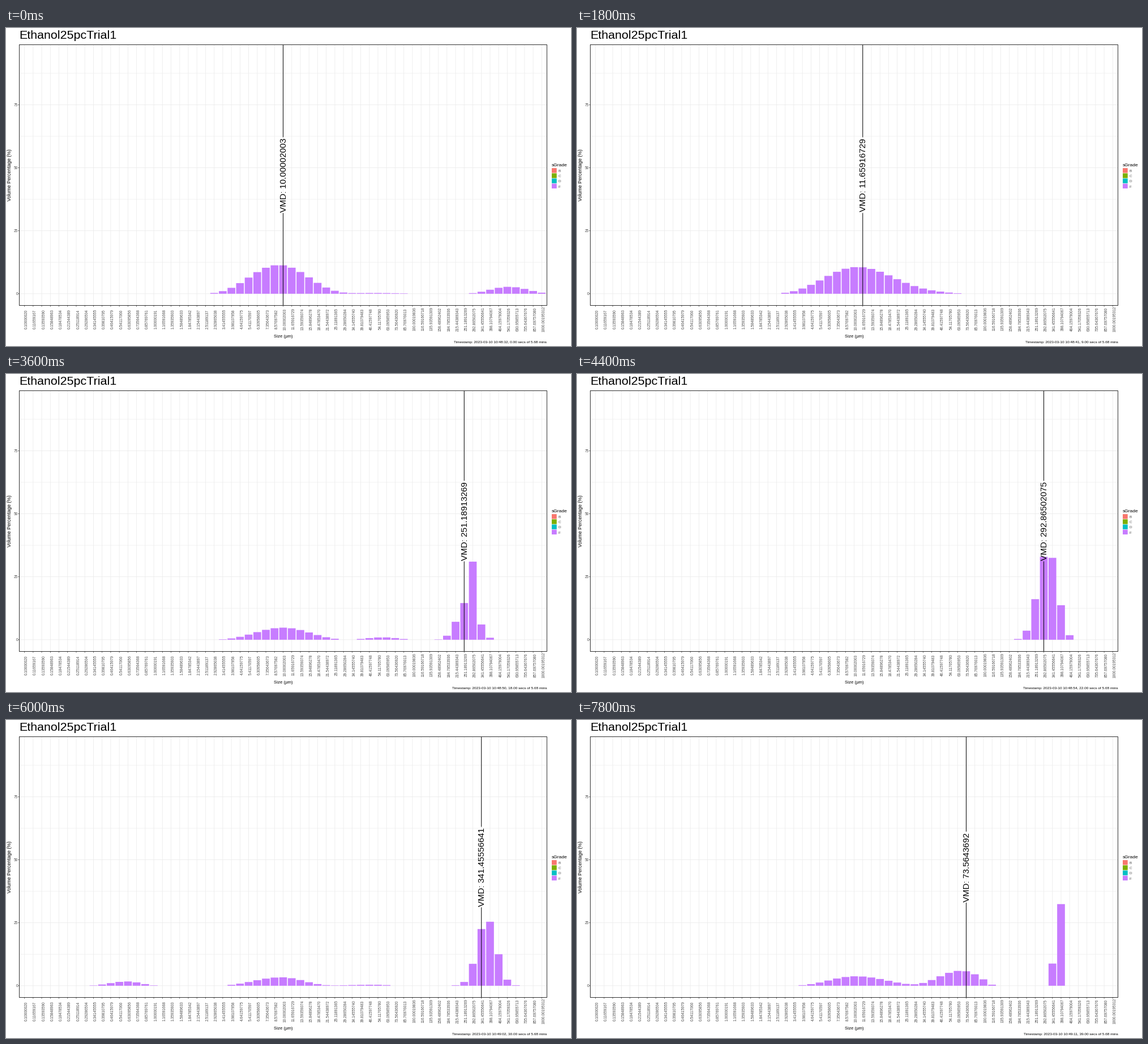
A matplotlib script that plays this animation: 998x561 px, repeating every 8 s.

```python
import numpy as np
import matplotlib.pyplot as plt
from matplotlib.animation import FuncAnimation
from matplotlib.patches import Rectangle

W, H, DPI = 998, 561, 100
FRAMES, STEP = 40, 200
LEFT, RIGHT, TOP, BOTTOM = 23.5, 955.5, 29.5, 489.5
MIDDLE = (TOP + BOTTOM) / 2
ZERO, UNIT = 468.8, 4.445          # y of 0 %, pixels per percent
PITCH = (RIGHT - LEFT) / 61.2
BINS = np.arange(61)
XS = LEFT + PITCH * (0.6 + BINS)
SIZES = np.float32(0.100000196 * 10 ** (BINS / 15))
TAIL = 48                          # first bin of the coarse group
CUT = 0.12
PURPLE, GREY = "#C77CFF", "#4d4d4d"

plt.rcParams["font.family"] = "Liberation Sans"


def bump(amp, mid, left, right, k=4.5):
    """Bell with finite support; k shapes the right flank."""
    below = BINS < mid
    d = (BINS - mid) / np.where(below, left, right)
    return amp * np.clip(1 - d * d, 0, 1) ** np.where(below, 4.5, k)


def bars(first, *values):
    out = np.zeros(61)
    out[first:first + len(values)] = values
    return out


KEYS = {
    0: bump(11.4, 29.5, 10.1, 10.2) + bump(0.3, 40.5, 9, 9)
       + bump(2.75, 56.2, 6.5, 6.5),
    9: bump(10.6, 30.4, 11.6, 12.6) + bump(0.73, 39, 8, 6),
    14: bump(8.8, 30, 9.6, 9.2) + bump(1.75, 41.6, 5.6, 5) + bars(53, 30.5),
    22: bars(49, 0.3, 3.6, 16.1, 32.9, 32.5, 13.7, 1.8),
    30: bump(1.7, 11.9, 5.9, 4.8) + bump(3.35, 29.8, 9.3, 7.6)
        + bump(0.4, 40.5, 9, 5)
        + bars(50, 0.2, 1.5, 8.7, 22.5, 25.4, 12.5, 2.4, 0.2),
    34: bars(6, 1.2) + bump(4.55, 29.4, 11.7, 10.7)
        + bump(2.85, 42.5, 7.3, 3.3, 1)
        + bars(54, 0.2, 1.9, 12.6, 22.1, 10.9, 1.1),
    39: bump(3.75, 30.2, 9.1, 10.4) + bump(5.95, 42.4, 7.7, 3.95, 1.5)
        + bars(53, 8.8, 32.4),
}
# short-lived fine particles: second -> centre bin
FINES = {5: 10, 6: 10, 16: 17, 21: 5, 27: 4, 28: 4, 32: 4, 37: 12}


def spread(n):
    """Volume percentage per bin at second n."""
    if n in KEYS:
        return KEYS[n]
    rng = np.random.default_rng(n)
    a = max(k for k in KEYS if k < n)
    b = min(k for k in KEYS if k > n)
    w = np.clip((n - a) / (b - a) + rng.normal(0, 0.12), 0, 1)
    v = (1 - w) * KEYS[a] + w * KEYS[b]
    tail = np.where(BINS >= TAIL, v, 0)
    shift = rng.integers(-1, 2)
    used = np.flatnonzero(tail > CUT)
    if used.size:
        shift = min(shift, 60 - used[-1])
    v = v - tail + np.roll(tail, shift)
    if n in FINES:
        v = v + bump(1.5, FINES[n], 5, 5)
    return 100 * v / v.sum()


fig = plt.figure(figsize=(W / DPI, H / DPI), dpi=DPI, facecolor="white")
ax = fig.add_axes([0, 0, 1, 1])
ax.set(xlim=(0, W), ylim=(H, 0))
ax.axis("off")


def line(x, y, width=1.0, color="black", z=1):
    return ax.plot(x, y, color=color, lw=width * 0.72, snap=False,
                   solid_capstyle="butt", zorder=z)[0]


def text(x, y, s, px, color="black", ha="left", rotation=0):
    return ax.text(x, y, s, fontsize=px * 0.72, color=color, ha=ha,
                   va="baseline", rotation=rotation,
                   rotation_mode="anchor", zorder=6)


def box(x, y, w, h, color, z=3):
    return ax.add_patch(Rectangle((x, y), w, h, facecolor=color, lw=0,
                                  snap=False, zorder=z))


# grid, ticks and labels
for p in np.arange(0, 100, 12.5):
    y = ZERO - p * UNIT
    major = p % 25 == 0
    line([LEFT, RIGHT], [y, y], 0.8 if major else 0.6, "#ebebeb")
    if major:
        line([LEFT - 2, LEFT], [y, y], 0.8, "#333333")
        text(21, y + 2.4, f"{p:.0f}", 6.6, GREY, "right")
for x, size in zip(XS, SIZES):
    line([x, x], [TOP, BOTTOM], 0.8, "#ebebeb")
    line([x, x], [BOTTOM, BOTTOM + 2], 0.8, "#333333")
    text(x + 5.3, 513.5, f"{size:.8f}", 6.6, GREY, "center", 90)
for xs, ys in (([LEFT, RIGHT, RIGHT, LEFT, LEFT],
                [TOP, TOP, BOTTOM, BOTTOM, TOP]),):
    line(xs, ys, 1.0, "#333333", 5)

text(23.5, 19.3, "Ethanol25pcTrial1", 21.5)
text(489.5, 545.6, "Size (µm)", 7.8, ha="center")
text(9.1, 259, "Volume Percentage (%)", 8.6, ha="center", rotation=90)

# legend
text(964, 243.6, "sGrade", 8.5)
for i, (grade, color) in enumerate(zip(
        "BCDF", ["#F8766D", "#7CAE00", "#00BFC4", PURPLE])):
    y = 247.2 + 9.15 * i
    box(964, y, 8.7, 8.4, color)
    text(975.5, y + 6.9, grade, 6.4, GREY)

# moving parts
columns = [box(x - 0.45 * PITCH, ZERO, 0.9 * PITCH, 0, PURPLE) for x in XS]
upper = line([0, 0], [TOP, TOP], z=4)
lower = line([0, 0], [BOTTOM, BOTTOM], z=4)
vmd = text(0, MIDDLE, "", 15.1, ha="center", rotation=90)
stamp = text(RIGHT, 556.3, "", 6.5, ha="right")


def update(n):
    v = spread(n)
    v = np.where(v < CUT, 0, v)
    for col, p in zip(columns, v):
        col.set_height(-p * UNIT)

    mid = np.searchsorted(np.cumsum(v), v.sum() / 2)
    x = XS[mid]
    value = f"{SIZES[mid]:.8f}".rstrip("0")
    half = 7.55 * (2.778 + 0.278 + 0.556 * (len(value) - 1)) + 1.8
    upper.set_data([x, x], [TOP, MIDDLE - half])
    lower.set_data([x, x], [MIDDLE + half, BOTTOM])
    vmd.set_text(f"VMD: {value}")
    vmd.set_x(x + 5.4)

    minute, second = divmod(48 * 60 + 32 + n, 60)
    stamp.set_text(f"Timestamp: 2023-03-10 10:{minute:02d}:{second:02d}, "
                   f"{n:.2f} secs of 5.68 mins")
    return [*columns, upper, lower, vmd, stamp]


anim = FuncAnimation(fig, update, frames=FRAMES, interval=STEP,
                     init_func=lambda: update(0), repeat=True, repeat_delay=0)
plt.show()
```
